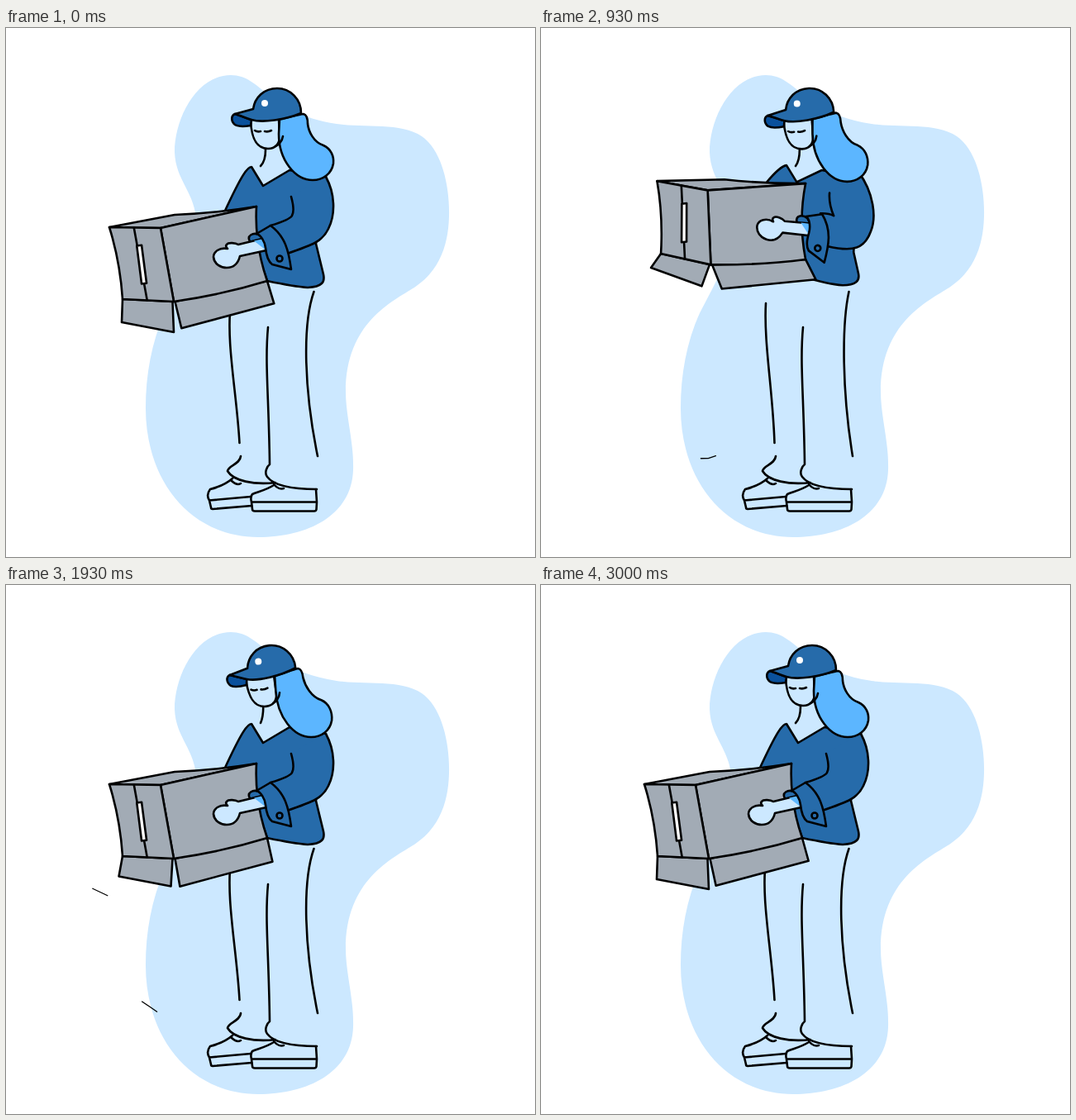
An HTML page that plays this animation: 640 by 640 pixels, repeating every 3070 ms.

```html
<!DOCTYPE html>
<html lang="en">
<head>
<meta charset="utf-8">
<title>Courier with a box</title>
<style>
  html, body { margin: 0; width: 100%; height: 100%; overflow: hidden; background: #fff; }
  svg { display: block; width: 100%; height: 100%; }
  path, circle { stroke: #000; stroke-width: 2.6; stroke-linecap: round; stroke-linejoin: round; fill: none; }
  .skin { fill: #cce8ff; }
  .cloth { fill: #266baa; }
  .dark { fill: #0a519c; }
  .sky { fill: #5cb6ff; }
  .card { fill: #a2abb5; }
  .white { fill: #fff; }
  .bare { stroke: none; }
  #wind path { stroke-width: 1.3; }
</style>
</head>
<body>
<svg viewBox="0 0 640 640">
  <path class="skin bare" d="M272 57C310 57 315 103 400 116C435 121 478 114 503 131C526 147 537 188 536 228C535 268 521 296 494 314C467 331 411 357 411 440C411 470 421 500 420 535C418 590 365 616 305 616C220 615 169 545 169 460C169 420 176 380 192 345C210 310 229 280 230 235C230 200 205 185 204 150C204 110 230 57 272 57Z"/>

  <!-- data-up holds the same path with the box at its highest -->
  <path id="legs"
    d="M272 333C266 380 279 440 282.500 502M372.500 319C358 360 361 440 377 518"
    data-up="M272 333C270 380 281 440 282.500 502M372.500 319C365 360 365 440 377 518"/>
  <path d="M317 362C313 405 318 445 319 528C316 530 312 538 316 543C325 555 350 558 376 558
    M284 518C283 528 269 529 268 536C275 548 300 553 326 550"/>
  <path d="M274 545C266 552 255 556 247 558C244 562 243 567 246 571.500L296 567M246 571.500L248 580Q248 582 250 582L297 578
    M272 547C277 552 281 553 284 551"/>
  <path d="M324 553C315 559 305 561 298 564C296 567 296 570 297 573.500L376 573.500M375 558L376 573.500L375.500 582.500Q375 584.500 373 584.500L301 584.500Q298 584.500 298 582L297 573.500
    M324 552C328 557 333 558 336 557"/>

  <path id="torso" class="cloth"
    d="M265 221C285 178 292 168 297 168L311 191L343 172L387 180L375 261L384 298C386 307 383 313 365 314C350 313 335 310 316 306L300 260Z"
    data-up="M274 185C280 177 290 167 297 166L309 186L339 172L381 180L379 272L384 297C386 306 380 311 365 311C350 310 335 306 316 300L312 245Z"/>
  <path id="neck"/>
  <path id="flapL" class="card"/>
  <path id="flapR" class="card"/>
  <path id="lid" class="card"/>
  <path id="side" class="card"/>
  <path id="front" class="card"/>
  <path id="tape"/>
  <path id="label" class="white"/>
  <g id="hand">
    <path class="cloth" d="M295 258C291 251 299 247 306 250C312 254 315 262 315 270Z"/>
    <path class="skin" d="M314 254L281 262C278 260 269 259 267 262C265 264 267 266 268 267C258 265 251 271 251 277C252 286 260 290 267 290C276 290 281 284 283 276L315 269"/>
    <path class="sky bare" d="M300 257.500L314 254.500L316 270Z"/>
  </g>
  <path id="sleeve" class="cloth"
    d="M345 204C348 215 349 222 346 227C344 231 330 236 320 239L340 273C372 262 383 258 390 243C399 225 398 200 387 180"
    data-up="M350 204C348 215 350 222 356 232C351 229 348 228 344 228L348 268C378 277 391 272 398 251C404 234 400 204 381 179"/>
  <g id="cuff">
    <path class="cloth" d="M303 249C308 250 313 258 314 266C315 276 318 283 322 286L345 292C342 270 338 252 320 239Z"/>
    <circle cx="331" cy="279" r="3.500"/>
  </g>

  <g class="head"><path class="skin" d="M296 113C297 130 301 146 317 146C326 146 331 140 331 131L330 110"/></g>
  <path id="hair" class="sky"
    d="M331 110C340 109 352 105 360 104C364 105 365 110 365 116C366 125 372 138 384 142C393 146 397 155 396 164C394 176 384 184 371 184C350 184 330 160 330 128Z"/>
  <g class="head">
    <path d="M335 131C334 138 329 142 326 143M301 124Q304 126 308 125M313 125Q317 126 321 124"/>
    <path class="dark" d="M277 104C272 106 272 113 277 117C282 120 290 119 296 118L297 111Z"/>
    <path class="cloth" d="M277 104L299 98C301 84 312 73 328 73C344 73 357 86 357 103C338 111 310 115 297 111C290 109 284 106 277 104Z"/>
    <circle class="white bare" cx="313" cy="91" r="4"/>
  </g>
  <g id="wind"></g>
</svg>
<script>
// Time is counted in steps, 14 a second.
const LOOP = 3070, FPS = 14, TOP = 16, LANDED = 22;
const $ = id => document.getElementById(id);
const clamp = v => Math.min(1, Math.max(0, v));
const smooth = (from, to, i) => {
  const s = clamp((i - from) / (to - from));
  return s * s * (3 - 2 * s);
};
const lerp = (a, b, t) => a + (b - a) * t;
const mix = (p, q, t) => [lerp(p[0], q[0], t), lerp(p[1], q[1], t)];
const add = (p, x, y) => [p[0] + x, p[1] + y];

// Maps every point of a path string.
const mapPath = (d, fn) => {
  let n = 0;
  return d.replace(/([\d.]+)[ ,]+([\d.]+)/g, (_, x, y) => fn(+x, +y, n++).map(v => v.toFixed(2)).join(' '));
};
const pathPoints = d => {
  const pts = [];
  mapPath(d, (x, y) => (pts.push([x, y]), [x, y]));
  return pts;
};
const set = (id, d) => $(id).setAttribute('d', d);
const poly = (id, pts) => set(id, 'M' + pts.join('L') + 'Z');
// Curve to q that sags away from the straight line p-q.
const bend = (p, q, x, y) => `Q${add(mix(p, q, 0.5), x, y)} ${q}`;

const morphs = ['legs', 'torso', 'sleeve'].map(id => {
  const { dataset, attributes } = $(id);
  return { id, low: attributes.d.value, high: pathPoints(dataset.up) };
});
const hairRest = $('hair').getAttribute('d');

// Box corners: x, y held low, then x, y held high.
const CORNERS = {
  topLeft: [125, 241, 144, 181], topMid: [187, 242, 205, 193], topRight: [303, 216, 324, 186], back: [204, 226, 226, 180],
  lowLeft: [141, 328, 146, 269], lowMid: [203, 331, 206, 283], lowRight: [316, 306, 321, 278]
};

// Sideways travel is even on the way up; height eases out.
function pose(i) {
  const s = i / TOP, fall = 1 - smooth(TOP, LANDED, i);
  const rising = i < TOP;
  const u = rising ? s : fall;
  const v = rising ? s * s * (3 - 2 * s) + 0.8 * s * (1 - s) ** 2 : fall;
  return { u, v, swing: Math.sin(Math.PI * u) };
}

function drawBox(i, { u, v }) {
  const c = {};
  for (const k in CORNERS) {
    const [x, y, X, Y] = CORNERS[k];
    c[k] = [lerp(x, X, u), lerp(y, Y, v)];
  }
  // The flaps are thrown open by the lift and settle after the landing.
  const left = smooth(4, 10, i) - smooth(LANDED, 30, i);
  const right = left * (1 - 0.6 * u ** 4) + 0.45 * (1 - smooth(3, 10, i) + smooth(34, 44, i));
  const hinge = add(c.lowMid, -1.5, 0), hinge2 = add(c.lowMid, 1.5, 0);
  const openL = (p, x, y) => add(p, x - 11 * left, y - 11 * left);
  const openR = (p, x, y) => add(p, x + 14 * right, y - 10.5 * right);
  poly('flapL', [c.lowLeft, openL(c.lowLeft, -1, 28), openL(c.lowMid, 0, 37), hinge]);
  poly('flapR', [hinge2, openR(c.lowMid, 3, 37), openR(c.lowRight, 2, 32), c.lowRight]);
  set('lid', `M${c.topLeft}L${c.back}${bend(c.back, c.topRight, 0, 3)}L${c.topMid}Z`);
  set('side', `M${c.topMid}L${c.topRight}${bend(c.topRight, c.lowRight, -9, 0)}${bend(c.lowRight, c.lowMid, 3, 4)}Z`);
  set('front', `M${c.topLeft}L${c.topMid}L${c.lowMid}L${c.lowLeft}${bend(c.lowLeft, c.topLeft, 5, -2)}Z`);
  const from = mix(c.topLeft, c.topMid, 0.48), to = mix(c.lowLeft, c.lowMid, 0.48);
  const a = mix(from, to, 0.25), b = mix(from, to, 0.77);
  set('tape', `M${from}L${to}`);
  poly('label', [add(a, -0.5, 0), add(a, 5.3, -0.7), add(b, 3, -0.5), add(b, -3, 0.3)]);
}

function drawBody({ u, v, swing }) {
  for (const { id, low, high } of morphs) {
    const b = id === 'sleeve' ? swing : 0;
    set(id, mapPath(low, (x, y, n) => [
      lerp(x, high[n][0], u) + (x - 345) / 10 * b,
      lerp(y, high[n][1], v) - 8 * b
    ]));
  }
  const place = (id, x, y, dx, dy, turn) =>
    $(id).setAttribute('transform', `translate(${dx} ${dy}) rotate(${turn} ${x} ${y})`);
  place('hand', 267, 276, 12.5 * u, -36 * v, 23 * u);
  place('cuff', 331, 279, 4 * u + swing, -10 * u - 8 * swing, 28 * u);
}

function drawHead(i, { v }) {
  const turn = 5.5 * (smooth(5, 23, i) - smooth(28, 42, i));
  const cx = 325, cy = 172;
  document.querySelectorAll('.head').forEach(h => h.setAttribute('transform', `rotate(${-turn} ${cx} ${cy})`));
  // Hair follows the head at its roots and hangs loose at its tips.
  set('hair', mapPath(hairRest, (x, y) => {
    const root = clamp((166 - y) / 50), loose = 1 - root;
    const r = -turn * root * Math.PI / 180, c = Math.cos(r), s = Math.sin(r);
    return [
      cx + (x - cx) * c - (y - cy) * s - 0.35 * turn * loose,
      cy + (x - cx) * s + (y - cy) * c + 2 * v * loose
    ];
  }));
  const x = 314 - turn / 2;
  set('neck', `M${x} 147C${x} 155 ${x - 1} 162 308 167`);
}

// Air streaks run left: the high lane is straight, the low one wavy.
const high = y => x => y + 0.47 * (x - 150);
const low = x => 513 + 0.12 * (x - 195) + 8 * Math.cos((x - 195) * 2 * Math.PI / 83);
const STREAKS = [
  { start: 5.6, from: 215, to: 196, lane: low },
  { start: 10.6, from: 215, to: 186, lane: low },
  { start: 15.3, from: 157, to: 125, lane: high(379) },
  { start: 20.2, from: 166, to: 79, lane: high(388.5) },
  { start: 21.4, from: 215, to: 58, lane: low }
];
for (const s of STREAKS) {
  s.line = document.createElementNS('http://www.w3.org/2000/svg', 'path');
  $('wind').appendChild(s.line);
}
function drawWind(i) {
  for (const { start, from, to, lane, line } of STREAKS) {
    const x = from - 9 * (i - start);
    const head = Math.max(to, x), tail = Math.min(from, x + 18);
    const mid = (head + tail) / 2;
    line.setAttribute('d', head < tail ? 'M' + [tail, mid, head].map(p => [p, lane(p)]).join('L') : '');
  }
}

function draw(i) {
  const p = pose(i);
  drawBody(p);
  drawBox(i, p);
  drawHead(i, p);
  drawWind(i);
}

// Steps fall on whole hundredths of a second.
const step = t => Math.ceil((Math.floor(t / 10) + 0.5) * FPS / 100) - 1;
const begin = performance.now();
let shown = -1;
function tick() {
  const i = step((performance.now() - begin) % LOOP);
  if (i !== shown) draw(shown = i);
  requestAnimationFrame(tick);
}
tick();
</script>
</body>
</html>
```
